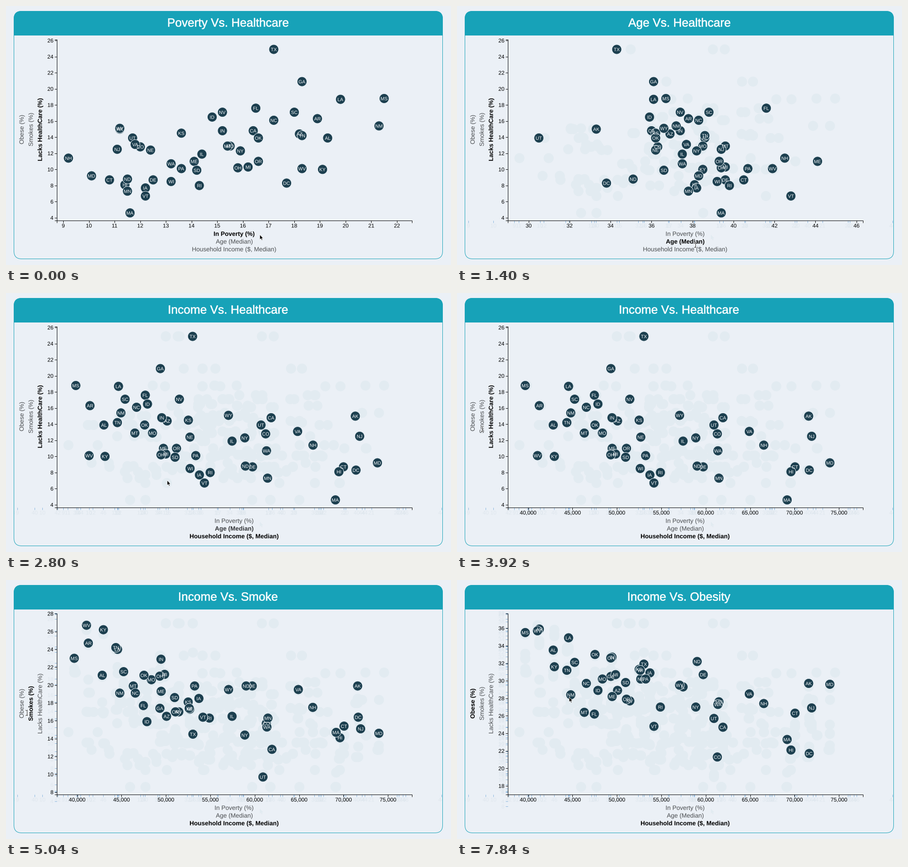
A matplotlib script for the animation above (8000 ms loop, 980 by 571 pixels).

```python
import numpy as np
import matplotlib.pyplot as plt
from matplotlib.animation import FuncAnimation
from matplotlib.collections import EllipseCollection, LineCollection
from matplotlib.patches import FancyBboxPatch, PathPatch, Polygon, Rectangle
from matplotlib.path import Path
from matplotlib.textpath import TextPath

W, H, DPI = 980, 571, 64
PX = 72 / DPI                      # one pixel in points
TICK_MS, HOLD, FRAMES = 40, 7, 200
STEP_SECONDS = 0.38                # chart time that passes per shown picture

PAGE, TEAL, DOT, RING = "#ebf0f6", "#17a2b8", "#1c3f4f", "#e6eef3"
GHOST, GHOST_TEXT, GHOST_TICK, MUTED = "#e2ebf1", "#dfe7ee", "#86b4de", "#4a4d50"
LEFT, RIGHT, TOP, BOTTOM = 111.5, 893.5, 73.5, 472.5

STATES = ("AL AK AZ AR CA CO CT DE DC FL GA HI ID IL IN IA KS KY LA ME MD MA MI "
          "MN MS MO MT NE NV NH NJ NM NY NC ND OH OK OR PA RI SC SD TN TX UT VT "
          "VA WA WV WI WY").split()

poverty = [19.3, 11.2, 18.2, 18.9, 16.4, 12, 10.8, 12.5, 17.7, 16.5, 18.3, 11.4, 14.8,
           14.4, 15.2, 12.2, 13.6, 19.1, 19.8, 14.1, 10.1, 11.6, 16.2, 11.5, 21.5, 15.5,
           15.4, 12.4, 15.2, 9.2, 11.1, 21.3, 15.9, 17.2, 11.5, 15.8, 16.6, 16.6, 13.6,
           14.3, 18, 14.2, 18.3, 17.2, 11.7, 12.2, 11.8, 13.2, 18.3, 13.2, 11.2]
age = [38.6, 33.3, 36.9, 37.8, 36, 36.3, 40.5, 39.6, 33.8, 41.6, 36.1, 38.1, 35.9,
       37.5, 37.4, 38.2, 36.2, 38.5, 36.1, 44.1, 38.3, 39.4, 39.6, 37.8, 36.7, 38.5,
       39.6, 36.2, 37.4, 42.5, 39.4, 37.2, 38.2, 38.3, 35.1, 39.4, 36.2, 39.3, 40.7,
       39.8, 38.8, 36.6, 38.6, 34.3, 30.5, 42.8, 37.7, 37.5, 41.9, 39.2, 36.6]
income = [42830, 71583, 50068, 41262, 61933, 61303, 70048, 59716, 71648, 47463, 49321,
          69592, 47861, 57444, 49446, 53712, 52504, 42958, 44555, 49462, 73971, 69160,
          49847, 61481, 39680, 48363, 46328, 52686, 51450, 66532, 71919, 44803, 58878,
          46556, 59029, 49308, 47529, 51075, 53234, 54891, 45238, 50979, 44361, 53035,
          60922, 54166, 64902, 61366, 41059, 52622, 57055]
healthcare = [13.9, 15, 14.4, 16.3, 14.8, 12.8, 8.7, 8.7, 8.3, 17.6, 20.9, 8.1, 16.5,
              11.9, 14.8, 7.7, 14.5, 10, 18.7, 11, 9.2, 4.6, 10.3, 7.3, 18.8, 12.9,
              12.9, 12.4, 17.1, 11.4, 12.5, 15.4, 12.3, 16.1, 8.8, 10.2, 13.9, 11, 10.1,
              8, 17.1, 9.9, 14.2, 24.9, 13.9, 6.7, 13.1, 10.7, 10.1, 8.5, 15.1]
smokes = [21.1, 19.9, 16.5, 24.7, 12.8, 15.7, 15.4, 19.9, 16.4, 17.7, 17.4, 14.1, 15.9,
          16.5, 22.9, 18.5, 18.1, 26.2, 24, 19.3, 14.6, 14.7, 21.2, 16.3, 23, 20.6,
          19.9, 17.3, 17, 17.5, 15.1, 19.1, 14.4, 19.1, 19.9, 21, 21.1, 17, 19.9,
          16.3, 21.5, 18.6, 24.2, 14.5, 9.7, 16.4, 19.5, 15.3, 26.7, 17.4, 19.5]
obesity = [33.5, 29.7, 28.9, 35.9, 24.7, 21.3, 26.3, 30.7, 21.7, 26.2, 30.5, 22.1, 28.9,
           29.3, 32.7, 30.9, 31.3, 31.6, 34.9, 28.2, 29.6, 23.3, 30.7, 27.6, 35.5, 30.2,
           26.4, 30.2, 27.7, 27.4, 26.9, 28.4, 27, 29.7, 32.2, 32.6, 33, 27.9, 30.2,
           27, 32.1, 29.8, 31.2, 31.9, 25.7, 24.8, 28.5, 27.3, 35.7, 31.2, 29.5]


class Field:
    """One data column with its linear scale and ticks."""

    def __init__(self, title, label, data, low, span, ticks):
        self.title, self.label, self.ticks = title, label, list(ticks)
        self.data, self.span = np.array(data, float), span
        self.domain = self.data.min() * low, self.data.max() * 1.05

    def scale(self, value):
        lo, hi = self.domain
        a, b = self.span
        return a + (value - lo) / (hi - lo) * (b - a)


ACROSS, UP = (LEFT, RIGHT), (BOTTOM, TOP)
X_FIELDS = [
    Field("Poverty", "In Poverty (%)", poverty, 0.95, ACROSS, range(9, 23)),
    Field("Age", "Age (Median)", age, 0.95, ACROSS, range(30, 47, 2)),
    Field("Income", "Household Income ($, Median)", income, 0.95, ACROSS,
          range(40000, 75001, 5000)),
]
Y_FIELDS = [
    Field("Healthcare", "Lacks HealthCare (%)", healthcare, 0.8, UP, range(4, 27, 2)),
    Field("Smoke", "Smokes (%)", smokes, 0.8, UP, range(8, 29, 2)),
    Field("Obesity", "Obese (%)", obesity, 0.8, UP, range(18, 37, 2)),
]
X_CLICKS, Y_CLICKS = (2.205, 7.737), (14.937, 21.071)   # in steps


def ease(t):
    t = min(max(t, 0), 1)
    return 4 * t ** 3 if t < 0.5 else 1 - 4 * (1 - t) ** 3


def axis_state(step, fields, clicks):
    """Active field, dot positions and ticks as (position, text, opacity)."""
    i = sum(c <= step for c in clicks)
    new, old = fields[i], fields[max(i - 1, 0)]
    e = ease((step - clicks[i - 1]) * STEP_SECONDS) if i else 1
    place = lambda a, b: (1 - e) * old.scale(a) + e * new.scale(b)
    ticks = []
    for v in sorted({*old.ticks, *new.ticks}):
        alpha = 1 if v in old.ticks and v in new.ticks else e if v in new.ticks else 1 - e
        if alpha > 0.01:
            ticks.append((place(v, v), f"{v:,}", alpha))
    return i, place(old.data, new.data), ticks


STEPS = range((FRAMES - 1) // HOLD + 1)
XS = [axis_state(s, X_FIELDS, X_CLICKS) for s in STEPS]
YS = [axis_state(s, Y_FIELDS, Y_CLICKS) for s in STEPS]

# Pointer path: step, x, y
POINTER = np.array([(0, 559, 504), (1, 552, 508), (2, 533, 519), (3, 532, 519),
                    (7, 517, 534), (8, 517, 534), (10, 355, 413), (14, 55, 300),
                    (16, 55, 300), (20, 36, 286), (22, 36, 286), (24, 112, 364),
                    (25, 150, 330), (27, 248, 223), (28, 247, 258)])
ARROW = np.array([(0, 0), (0, 11), (2.5, 8.8), (4.3, 12.6), (6, 11.8), (4.3, 8.2), (7.5, 8.2)])

fig = plt.figure(figsize=(W / DPI, H / DPI), dpi=DPI, facecolor=PAGE)
ax = fig.add_axes([0, 0, 1, 1])
ax.set(xlim=(0, W), ylim=(H, 0))
ax.axis("off")
view = Rectangle((18, 65), 943, 492, transform=ax.transData)
live, glyph_cache = [], {}


def text_path(s, x, y, size, weight="normal", align=0.5, turned=False):
    key = s, size, weight
    if key not in glyph_cache:
        glyph_cache[key] = TextPath((0, 0), s, size=size,
                                    prop={"family": "Liberation Sans", "weight": weight})
    path = glyph_cache[key]
    box = path.get_extents()
    along = path.vertices[:, 0] - box.x0 - box.width * align
    rise = path.vertices[:, 1]
    xy = (x - rise, y - along) if turned else (x + along, y - rise)
    return Path(np.column_stack(xy), path.codes)


def add(artist, z, clip=False, keep=False):
    artist.set_zorder(z)
    if isinstance(artist, (EllipseCollection, LineCollection)):
        ax.add_collection(artist, autolim=False)
    else:
        ax.add_patch(artist)
    if clip:
        artist.set_clip_path(view)
    if not keep:
        live.append(artist)
    return artist


def add_text(paths, color, z, clip=False, alpha=1, lw=0):
    path = Path.make_compound_path(*paths)
    add(PathPatch(path, fc=color, ec=color if lw else "none", lw=lw * PX, alpha=alpha), z, clip)


def add_dots(xy, radius, face, edge, z):
    n = len(xy)
    add(EllipseCollection([2 * radius] * n, [2 * radius] * n, [0] * n, units="xy",
                          offsets=xy, offset_transform=ax.transData, facecolors=[face] * n,
                          edgecolors=edge, linewidths=PX), z, clip=True)


def x_mark(p):
    return [(p, BOTTOM), (p, BOTTOM + 5)]


def y_mark(p):
    return [(LEFT - 5, p), (LEFT, p)]


def x_number(p, s):
    return text_path(s, p, 488.4, 12)


def y_number(p, s):
    return text_path(s, 104, p + 4.3, 12, align=1)


def draw_ghosts(step):
    """Faint traces left behind by everything that has moved."""
    past = [np.column_stack((XS[s][1], YS[s][1])) for s in range(step)]
    if not past:
        return
    add_dots(np.unique(np.round(np.vstack(past), 1), axis=0), 11, GHOST, "none", 1)
    for states, mark, number in ((XS, x_mark, x_number), (YS, y_mark, y_number)):
        seen = {(round(p, 1), s) for state in states[:step] for p, s, a in state[2]
                if a > 0.5 and 0 < p < W}
        add(LineCollection([mark(p) for p, _ in seen], colors=GHOST_TICK, lw=PX), 2, True)
        add_text([number(p, s) for p, s in sorted(seen)], GHOST_TEXT, 1.5, True)
    if step > 1:
        add(Polygon(ARROW + POINTER[0, 1:], fc=GHOST, ec="none"), 1)


def draw_axes(step):
    for states, mark, number in ((XS, x_mark, x_number), (YS, y_mark, y_number)):
        for p, s, alpha in states[step][2]:
            if -30 < p < W + 30:
                add(LineCollection([mark(p)], colors="black", lw=PX, alpha=alpha), 3, True)
                add_text([number(p, s)], "black", 3, True, alpha)


def draw_labels(step):
    xi, yi = XS[step][0], YS[step][0]
    title = f"{X_FIELDS[xi].title} Vs. {Y_FIELDS[yi].title}"
    add_text([text_path(title, 489.5, 45.5, 26.2)], "#fafdfe", 6, lw=0.6)
    for i, field in enumerate(X_FIELDS):
        bold, color = i == xi, "black" if i == xi else MUTED
        if step == 8 and i:
            color = DOT if i == 2 else "#202224"
        elif step in (9, 10) and i == 1:
            bold, color = True, "#333538"
        add_text([text_path(field.label, 502.5, 506.8 + 17 * i, 13.6,
                            "bold" if bold else "normal")], color, 5)
    for i, field in enumerate(Y_FIELDS):
        weight, color = ("bold", "black") if i == yi else ("normal", MUTED)
        add_text([text_path(field.label, 79.3 - 20.2 * i, 272.5, 13.6, weight, turned=True)],
                 color, 5)


def draw_pointer(step):
    x, y = (np.interp(step, POINTER[:, 0], POINTER[:, k]) for k in (1, 2))
    if x < 80 or y > 508.5:
        beam = [[(x, y - 5), (x, y + 5)]]
        beam += [[(x - 2.5, y + d * 6), (x, y + d * 5), (x + 2.5, y + d * 6)] for d in (-1, 1)]
        add(LineCollection(beam, colors="white", lw=2.4 * PX), 8)
        add(LineCollection(beam, colors="#222222", lw=PX), 9)
    else:
        add(Polygon(ARROW + (x, y), fc="black", ec="white", lw=0.8 * PX), 9)


def draw_static():
    def card(**style):
        return FancyBboxPatch((17.5, 11.5), 944, 546, mutation_aspect=1,
                              boxstyle="round,pad=0,rounding_size=17", **style)
    add(card(fc="none", ec=TEAL, lw=PX), 0.5, keep=True)
    header = add(card(fc=TEAL, ec=TEAL, lw=PX), 0.6, keep=True)
    header.set_clip_path(Rectangle((0, 0), W, 65, transform=ax.transData))
    domains = [[(LEFT, BOTTOM + 5), (LEFT, BOTTOM), (RIGHT, BOTTOM), (RIGHT, BOTTOM + 5)],
               [(LEFT - 5, TOP), (LEFT, TOP), (LEFT, BOTTOM), (LEFT - 5, BOTTOM)]]
    add(LineCollection(domains, colors="black", lw=PX), 3, keep=True)


shown = None


def update(frame):
    global shown
    step = frame // HOLD
    if step == shown:
        return []
    shown = step
    while live:
        live.pop().remove()
    draw_ghosts(step)
    draw_axes(step)
    xy = np.column_stack((XS[step][1], YS[step][1]))
    add_dots(xy, 10.6, DOT, RING, 4)
    add_text([text_path(s, x, y + 3.9, 10.4) for s, (x, y) in zip(STATES, xy)], "#f4f8fa", 4.5)
    draw_labels(step)
    draw_pointer(step)
    return []


draw_static()
animation = FuncAnimation(fig, update, frames=FRAMES, init_func=lambda: update(0),
                          interval=TICK_MS, repeat=True, cache_frame_data=False)
plt.show()
```
